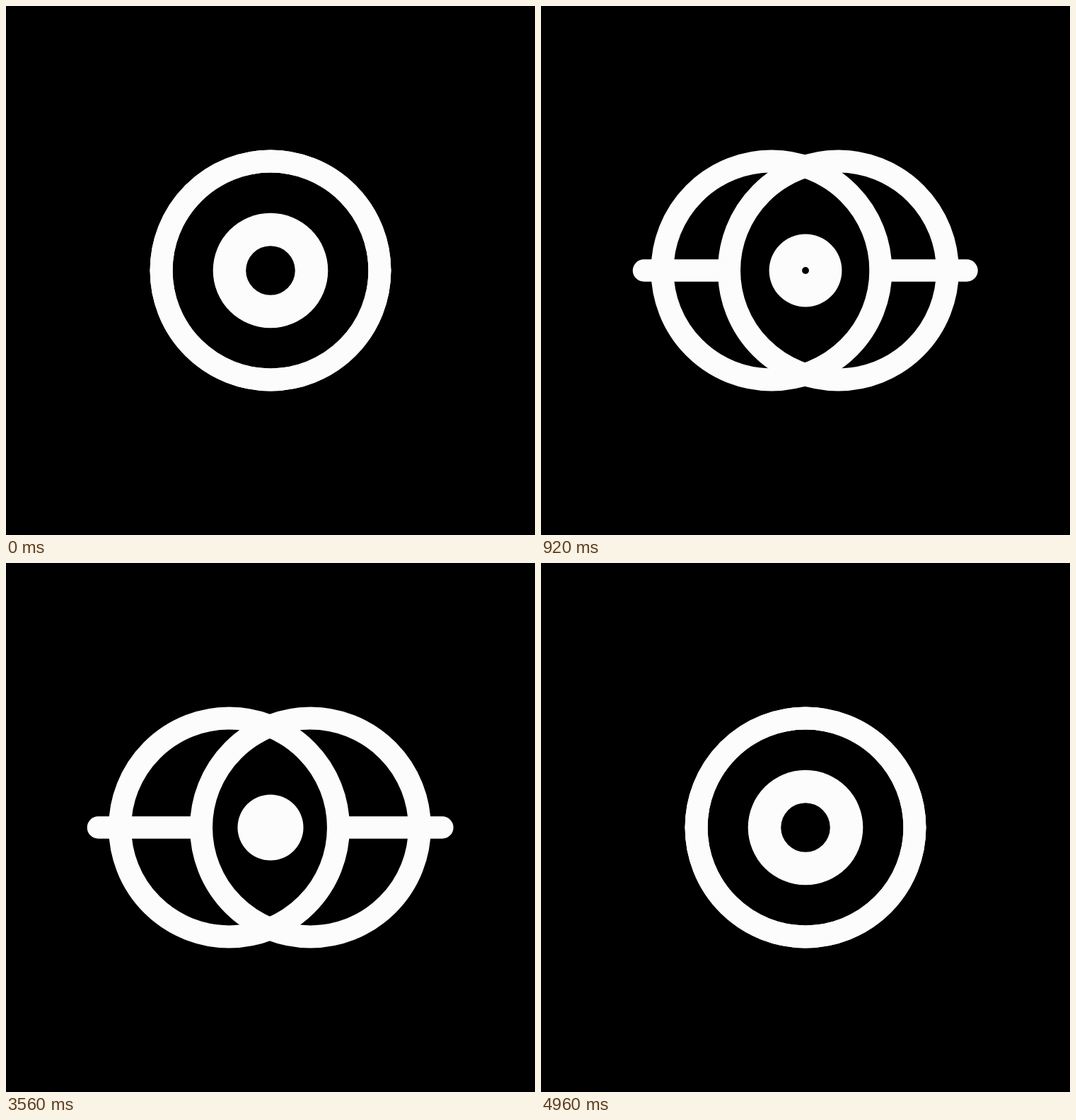
Recreate the animation shown at these times as an HTML page. Size 748 px wide and 748 px high, loop 5000 ms.

```html
<!DOCTYPE html>
<html lang="en">
<head>
<meta charset="utf-8">
<title>Ring to globe</title>
<style>
  html, body { margin: 0; width: 100%; height: 100%; overflow: hidden; background: #000; }
  svg { display: block; width: 100%; height: 100%; }
  .line { fill: none; stroke: #fcfcfc; stroke-linecap: round; }
  .ring { stroke-width: 32; }
  .bar { stroke-width: 31.4; }
</style>
</head>
<body>
<svg viewBox="0 0 748 748">
  <circle id="ringL" class="line ring" cy="374" r="154.4"/>
  <circle id="ringR" class="line ring" cy="374" r="154.4"/>
  <line id="barL" class="line bar" y1="374" y2="374"/>
  <line id="barR" class="line bar" y1="374" y2="374"/>
  <circle id="iris" cx="374" cy="374" fill="#fcfcfc"/>
  <circle id="pupil" cx="374" cy="374" fill="#000"/>
</svg>
<script>
const LOOP = 5000, STEP = 40, MOVE = 1500, OPEN_AT = 6, CLOSE_AT = 3505;
const RADIUS = 154.4;
const $ = id => document.getElementById(id);
const set = (id, attrs) => {
  for (const name in attrs) $(id).setAttribute(name, attrs[name]);
};
const mix = (a, b, p) => a + (b - a) * p;

// Symmetric ease, the same as cubic-bezier(k, 0, 1 - k, 1).
function ease(x, k) {
  if (x <= 0) return 0;
  if (x >= 1) return 1;
  let lo = 0, hi = 1;
  for (let i = 0; i < 30; i++) {
    const s = (lo + hi) / 2, r = 1 - s;
    const bx = 3 * r * r * s * k + 3 * r * s * s * (1 - k) + s * s * s;
    if (bx < x) lo = s; else hi = s;
  }
  return lo * lo * (3 - 2 * lo);
}

function openness(t, k) {
  return t < LOOP / 2
    ? ease((t - OPEN_AT) / MOVE, k)
    : 1 - ease((t - CLOSE_AT) / MOVE, k);
}

function draw(t) {
  const spread = openness(t, 0.78);
  const reach = openness(t, 0.8);
  const hole = 34.8 * (1 - openness(t, 0.874));
  const left = mix(374, 315.5, spread);
  const right = mix(374, 430.5, spread);

  set('ringL', { cx: left });
  set('ringR', { cx: right });
  set('barL', { x1: mix(219.4, 130.3, reach), x2: right - RADIUS });
  set('barR', { x1: left + RADIUS, x2: mix(528.6, 617, reach) });
  set('iris', { r: 46.5 + hole });
  set('pupil', { r: hole });
}

const start = performance.now();
function tick() {
  const t = (performance.now() - start) % LOOP;
  draw(Math.floor(t / STEP) * STEP);
  requestAnimationFrame(tick);
}
tick();
</script>
</body>
</html>
```
